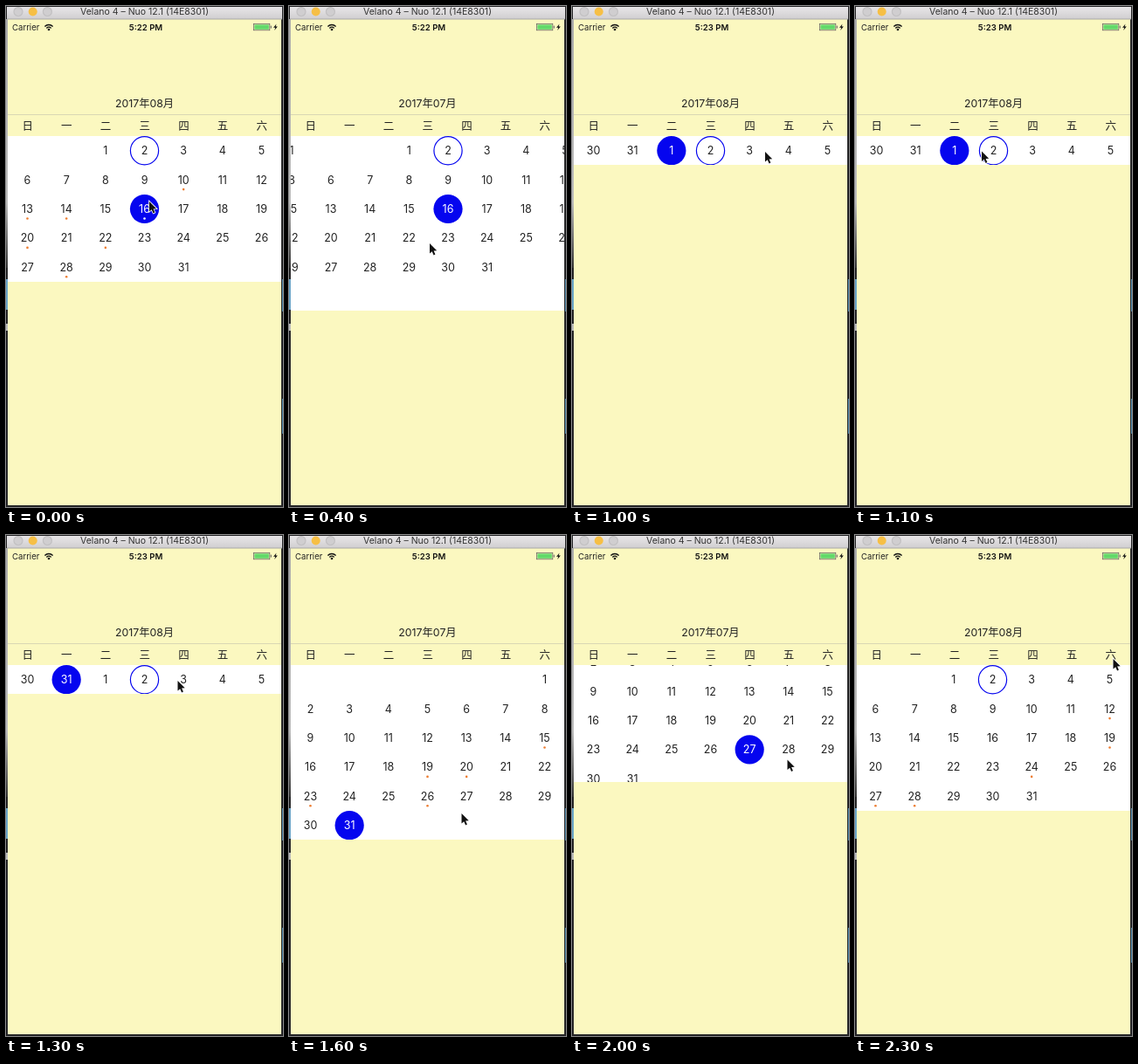
Animation of 317x574 px, one loop 2.4 s. Source, as an HTML page with a canvas:

```html
<!DOCTYPE html>
<html lang="zh">
<head>
<meta charset="utf-8">
<title>Calendar</title>
<style>
html, body { margin: 0; width: 100%; height: 100%; overflow: hidden; background: #222; }
canvas { display: block; }
</style>
</head>
<body>
<canvas id="stage" width="317" height="574"></canvas>
<script>
const ctx = document.getElementById('stage').getContext('2d');
const STEP = 100, STEPS = 24;
const LEFT = 2, TOP = 149, WIDTH = 313, COL = 44.67, ROW = 33.4;
const BLUE = '#0505ef', INK = '#222', YELLOW = '#fbf8c0';
const SANS = 'Inter, "Noto Sans CJK SC", "Noto Sans CJK", sans-serif';
const CJK = '"Noto Sans CJK SC", "Noto Sans CJK", sans-serif';

// Days count from August 1 = 1, so July 31 = 0.
// x: scroll of the August page, h: visible rows, up: rows hidden above.
const changes = {
  0: { x: 0, month: 8, h: 5, up: 0, week: false, sel: 16, time: '5:22', dots: [10, 13, 14, 16, 20, 22, 28] },
  2: { x: 120, dots: [] },
  3: { x: 290, month: 7, h: 6 },
  4: { x: 23.5 },
  5: { x: 0, month: 8, h: 5 },
  6: { time: '5:23' },
  8: { sel: 1 },
  9: { h: 2.4 },
  10: { h: 1, week: true },
  12: { sel: 0 },
  14: { x: WIDTH, month: 7, h: 3.5, up: 2.5, week: false, dots: [-16, -12, -11, -8, -5] },
  15: { h: 6, up: 0 },
  17: { sel: -4, dots: [] },
  18: { h: 3, up: 2 },
  19: { h: 1, up: 4, week: true },
  20: { h: 4, up: 1.6, week: false },
  21: { h: 6, up: 0 },
  22: { x: 110, month: 8, h: 5.4, dots: [12, 19, 24, 27, 28] },
  23: { x: -1, h: 5 }
};
const states = [];
for (let i = 0; i < STEPS; i++) states.push({ ...states[i - 1], ...changes[i] });

// step, x, y of the pointer tip
const path = [[0, 164, 224], [2, 130, 262], [3, 245, 270], [4, 161, 272], [6, 125, 240], [8, 112, 160],
  [10, 221, 167], [12, 69, 166], [13, 196.5, 167], [16, 197.5, 319], [17, 202, 300],
  [19, 243, 175], [21, 250, 340], [23, 295.5, 142]];

function pointerAt(step) {
  const k = path.findIndex(p => p[0] >= step);
  const b = path[k], a = path[Math.max(0, k - 1)];
  const u = a === b ? 0 : (step - a[0]) / (b[0] - a[0]);
  return [a[1] + (b[1] - a[1]) * u, a[2] + (b[2] - a[2]) * u];
}

function rect(x, y, w, h, color) {
  ctx.fillStyle = color;
  ctx.fillRect(x, y, w, h);
}

function disc(x, y, r, color, ring) {
  ctx.beginPath();
  ctx.arc(x, y, r, 0, 7);
  ctx.fillStyle = ctx.strokeStyle = color;
  ctx.lineWidth = 1.2;
  ring ? ctx.stroke() : ctx.fill();
}

function text(str, x, y, size, { color = INK, weight = 400, family = SANS, align = 'center' } = {}) {
  ctx.font = `${weight} ${size}px ${family}`;
  ctx.textAlign = align;
  ctx.fillStyle = color;
  ctx.fillText(str, x, y + size * 0.364);
}

function polygon(points, fill, stroke) {
  ctx.beginPath();
  points.forEach(([x, y]) => ctx.lineTo(x, y));
  ctx.closePath();
  if (stroke) {
    ctx.strokeStyle = stroke;
    ctx.lineWidth = 1.6;
    ctx.stroke();
  }
  ctx.fillStyle = fill;
  ctx.fill();
}

function desktop() {
  rect(0, 0, 317, 574, '#242426');
  const shade = ctx.createLinearGradient(0, 0, 0, 300);
  shade.addColorStop(0, '#aaa');
  shade.addColorStop(0.75, '#bcbcbc');
  shade.addColorStop(1, '#333');
  rect(0, 15, 2, 285, shade);
  rect(0, 313, 2, 35, '#6aa5c8');
  rect(0, 364, 2, 8, '#bbb');
  rect(316, 313, 1, 37, '#5a93b4');
  rect(316, 450, 1, 40, '#5a93b4');
}

function chrome(time) {
  const bar = ctx.createLinearGradient(0, 1, 0, 15);
  bar.addColorStop(0, '#e8e6e8');
  bar.addColorStop(1, '#d0ced0');
  rect(1, 1, 315, 14, bar);
  rect(1, 14.5, 315, 1, '#aaa');
  ['#d0ced0', '#f6bf45', '#d0ced0'].forEach((color, i) => {
    disc(14 + i * 16.7, 6.5, 5, color);
    if (i !== 1) disc(14 + i * 16.7, 6.5, 5, '#c2c0c2', true);
  });
  text('Velano 4 – Nuo 12.1 (14E8301)', 158.5, 6.5, 10.5, { color: '#333' });

  text('Carrier', 7, 24.3, 9.6, { align: 'left' });
  ctx.strokeStyle = '#111';
  ctx.lineWidth = 1.4;
  for (const r of [3.7, 6.5]) {
    ctx.beginPath();
    ctx.arc(49, 28, r, -2.36, -0.78);
    ctx.stroke();
  }
  disc(49, 27, 1.3, '#111');
  text(time + ' PM', 160, 24.3, 9.6, { weight: 600, color: '#111' });
  ctx.strokeStyle = '#555';
  ctx.lineWidth = 0.7;
  ctx.strokeRect(283.4, 20.4, 18.4, 7.4);
  rect(284.4, 21.4, 16.4, 5.4, '#63d96a');
  rect(302.7, 22.6, 1, 3, '#555');
  polygon([[309.5, 20.5], [306, 24.8], [308.2, 24.8], [307.2, 28], [310.8, 23.6], [308.6, 23.6]], '#111');
}

function page(month, x, s) {
  const first = month === 8 ? 2 : 6;
  const base = month === 8 ? 0 : -31;
  for (let i = 0; i < 42; i++) {
    const d = i - first + 1;
    if ((d < 1 || d > 31) && !s.week) continue;
    const day = d + base;
    const cx = LEFT + x + 22.5 + (i % 7) * COL;
    const cy = TOP + 16.7 + (Math.floor(i / 7) - s.up) * ROW;
    const chosen = day === s.sel;
    if (chosen) disc(cx, cy, 16.6, BLUE);
    else if (day === 2) disc(cx, cy, 16.1, BLUE, true);
    text((d + 30) % 31 + 1, cx, cy, 12.5, { color: chosen ? '#fff' : INK });
    if (s.dots.includes(day)) disc(cx, cy + 11, 1.3, chosen ? '#fff' : '#ed7d31');
  }
}

function calendar(s) {
  text(`2017年0${s.month}月`, 158.5, 112, 12.3);
  rect(LEFT, 124, WIDTH, 1, '#d9d7b4');
  [...'日一二三四五六'].forEach((c, i) =>
    text(c, LEFT + 22.7 + i * COL, 137, 12.5, { family: CJK }));
  ctx.save();
  ctx.beginPath();
  ctx.rect(LEFT, TOP, WIDTH, Math.round(s.h * ROW));
  ctx.clip();
  rect(LEFT, TOP, WIDTH, 210, '#fff');
  if (s.x < WIDTH) page(8, s.x, s);
  if (s.x > 0) page(7, s.x - WIDTH, s);
  ctx.restore();
}

function pointer(x, y) {
  const shape = [[0, 0], [0, 11.5], [2.7, 9.2], [4.6, 13.4], [6.4, 12.6], [4.6, 8.5], [8.2, 8.2]];
  polygon(shape.map(([px, py]) => [x + px, y + py]), '#111', '#fff');
}

function draw(now) {
  const step = Math.floor(now / STEP) % STEPS;
  const s = states[step];
  desktop();
  rect(LEFT, 15, WIDTH, 557, YELLOW);
  chrome(s.time);
  calendar(s);
  pointer(...pointerAt(step));
  requestAnimationFrame(() => draw(performance.now() - start));
}

const start = performance.now();
draw(0);
</script>
</body>
</html>
```
